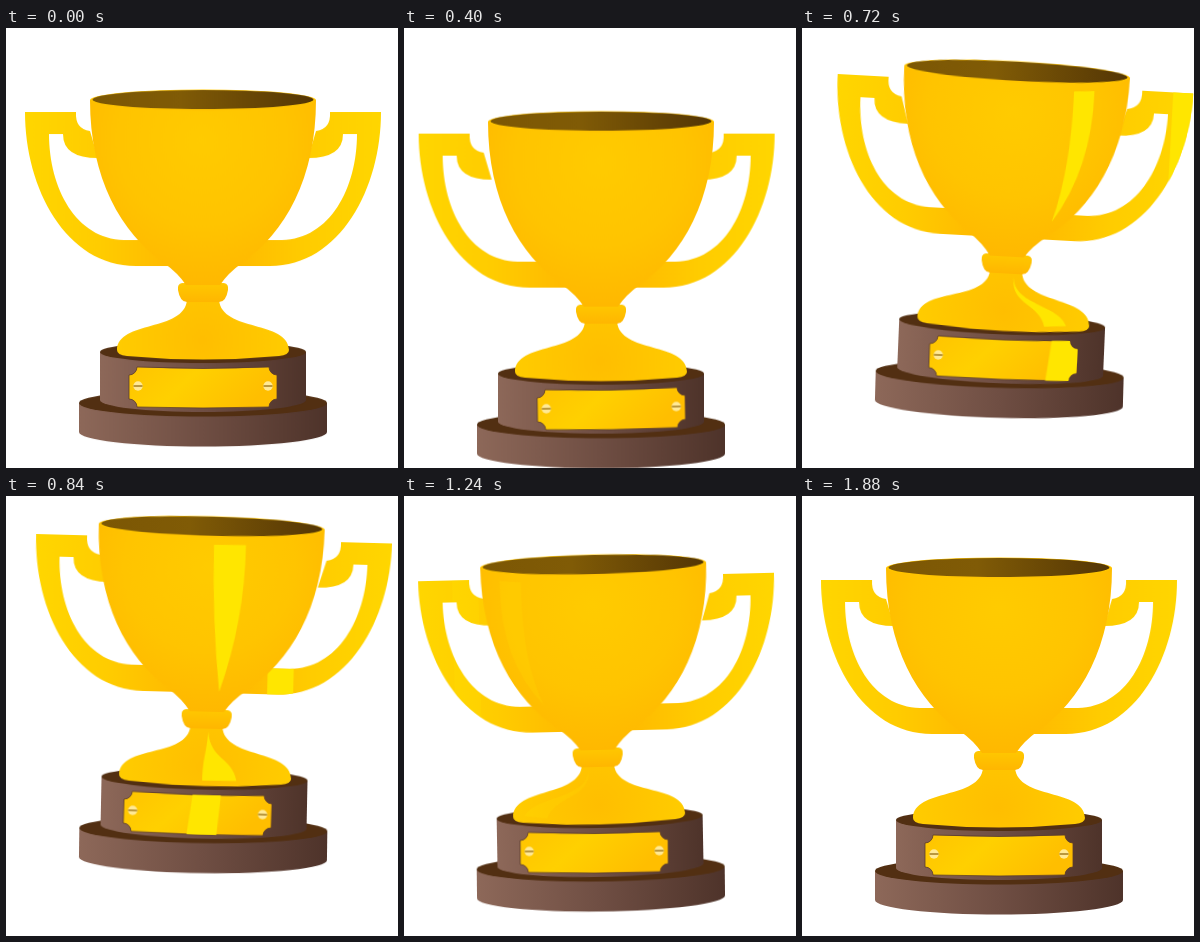
Recreate the animation shown at these times as an HTML page. Size 392 by 440 pixels, loop 1920 ms.

```html
<!DOCTYPE html>
<html lang="en">
<head>
<meta charset="utf-8">
<title>Trophy jump</title>
<style>
html, body { margin: 0; width: 100%; height: 100%; overflow: hidden; background: #fff; }
svg { display: block; width: 392px; height: 440px; }
.jump, .swing, .yaw, .turn, .glare, .strip, .flash { animation: 1920ms linear infinite; }
.jump { animation-name: jump; }
.swing { animation-name: swing; transform-origin: 197px 400px; --k: 1; }
.drum { --k: .75; }
.disk { --k: .5; }
.yaw { animation-name: yaw; }
.turn { animation-name: turn; transform-origin: 197px 359px; }
.glare { animation-name: glare; fill: #ffe600; }
.strip { animation-name: strip; }
.flash { animation-name: flash; }

@keyframes jump {
  0% { transform: translateY(0); animation-timing-function: ease; }
  25%, 31.6% { transform: translateY(22px); animation-timing-function: ease; }
  43.6% { transform: translateY(-41.5px); animation-timing-function: ease; }
  75%, 100% { transform: translateY(0); }
}
/* --k: the lower parts lean less than the cup */
@keyframes swing {
  0%, 30.9% { transform: rotate(0deg); animation-timing-function: ease-in-out; }
  36.6% { transform: rotate(calc(3.2deg * var(--k))); animation-timing-function: ease-in-out; }
  55.8% { transform: rotate(calc(-2.5deg * var(--k))); animation-timing-function: ease-in-out; }
  74.5%, 100% { transform: rotate(0deg); }
}
/* handles drift against the plate as the trophy turns */
@keyframes yaw {
  0% { transform: translateX(0); animation-timing-function: ease; }
  25%, 28.6% { transform: translateX(-4.4px); animation-timing-function: ease-in-out; }
  48%, 57% { transform: translateX(3.4px); animation-timing-function: ease; }
  100% { transform: translateX(0); }
}
@keyframes turn {
  0% { transform: translateX(0) rotate(0); animation-timing-function: ease; }
  25%, 28.6% { transform: translateX(10.5px) rotate(-1deg); animation-timing-function: ease-in-out; }
  48%, 57% { transform: translateX(-8px) rotate(.9deg); animation-timing-function: ease; }
  100% { transform: translateX(0) rotate(0); }
}
@keyframes glare {
  0%, 30.5% { opacity: 0; }
  31.5%, 54% { opacity: 1; }
  66.5%, 100% { opacity: 0; }
}
@keyframes strip {
  0%, 31.25% { transform: translateX(273px); }
  56.25%, 100% { transform: translateX(-131px); }
}
@keyframes flash {
  0%, 31.25% { transform: translateX(114px); }
  56.25%, 100% { transform: translateX(-99px); }
}
</style>
</head>
<body>
<svg viewBox="0 0 392 440">
  <defs>
    <linearGradient id="wood">
      <stop stop-color="#8d6859"/><stop offset=".5" stop-color="#6f4e43"/><stop offset="1" stop-color="#4e332a"/>
    </linearGradient>
    <linearGradient id="inside">
      <stop stop-color="#7c5704"/><stop offset=".4" stop-color="#805b06"/><stop offset="1" stop-color="#543605"/>
    </linearGradient>
    <linearGradient id="arm">
      <stop stop-color="#ffd600"/><stop offset=".5" stop-color="#ffcc00"/><stop offset="1" stop-color="#ffb900"/>
    </linearGradient>
    <linearGradient id="brass" x2="1" y2=".3">
      <stop stop-color="#ffc400"/><stop offset=".45" stop-color="#ffd000"/><stop offset="1" stop-color="#ffbe00"/>
    </linearGradient>
    <linearGradient id="neck" x2="0" y2="1">
      <stop stop-color="#ffc800"/><stop offset="1" stop-color="#ffb600"/>
    </linearGradient>
    <radialGradient id="gold" gradientUnits="userSpaceOnUse" cx="196" cy="112" r="155">
      <stop stop-color="#ffcb00"/><stop offset=".55" stop-color="#ffc400"/><stop offset="1" stop-color="#ffb600"/>
    </radialGradient>
    <radialGradient id="footGold" gradientUnits="userSpaceOnUse" cx="197" cy="312" r="88">
      <stop stop-color="#ffbe00"/><stop offset="1" stop-color="#ffcc00"/>
    </radialGradient>
    <path id="handle" d="M19 84H70Q69 101 84 103L92 130Q57 130 57 106H43C43 160 70 211 118 212H140L170 238H130C60 238 19 160 19 84Z"/>
    <path id="bowl" d="M84 72C84 150 115 205 158 235Q172 245 180 257H214Q222 245 236 235C279 205 310 150 310 72Z"/>
    <path id="foot" d="M181 272C178 304 112 292 111 322Q111 327 121 328Q197 335 273 328Q283 327 283 322C282 292 216 304 213 272Z"/>
    <path id="plate" d="M131 339Q197 342 263 339A8 8 0 0 0 271 347V371A8 8 0 0 0 263 379Q197 381 131 379A8 8 0 0 0 123 371V347A8 8 0 0 0 131 339Z"/>
    <g id="screw">
      <circle r="4.7" fill="#ffe995"/><path d="M-4.5 0H4.5" stroke="#9b7418" stroke-width="1.4"/>
    </g>
    <clipPath id="onHandles">
      <use href="#handle"/><use href="#handle" transform="matrix(-1 0 0 1 394 0)"/>
    </clipPath>
    <clipPath id="onBowl"><use href="#bowl"/></clipPath>
    <clipPath id="onFoot"><use href="#foot"/></clipPath>
    <clipPath id="onPlate"><use href="#plate"/></clipPath>
  </defs>

  <g class="jump">
    <g class="swing disk">
      <path d="M73 375V404A124 14.5 0 0 0 321 404V375Z" fill="url(#wood)"/>
      <ellipse cx="197" cy="375" rx="124" ry="13.5" fill="#522f12"/>
    </g>

    <g class="swing drum">
      <path d="M94 324V372A103 12 0 0 0 300 372V324Z" fill="url(#wood)"/>
      <ellipse cx="197" cy="324" rx="103" ry="11" fill="#522f12"/>
      <g class="turn">
        <use href="#plate" fill="url(#brass)" stroke="#5a3a2b" stroke-width=".8"/>
        <use href="#screw" x="132" y="358"/>
        <use href="#screw" x="262" y="358"/>
        <g class="glare" clip-path="url(#onPlate)">
          <path class="flash" d="M185 336H213L209 384H179Z"/>
        </g>
      </g>
    </g>

    <g class="swing">
      <g class="yaw">
        <use href="#handle" fill="url(#arm)"/>
        <use href="#handle" fill="url(#arm)" transform="matrix(-1 0 0 1 394 0)"/>
        <g class="glare" clip-path="url(#onHandles)">
          <rect class="strip" x="184" y="80" width="26" height="164"/>
        </g>
      </g>

      <use href="#foot" fill="url(#footGold)"/>
      <g class="glare" clip-path="url(#onFoot)"><path id="footGlare"/></g>
      <path d="M176 255H218Q223 256 222 262Q220 274 213 274H181Q174 274 172 262Q171 256 176 255Z" fill="url(#neck)"/>
      <use href="#bowl" fill="url(#gold)"/>
      <g class="glare" clip-path="url(#onBowl)"><path id="bowlGlare"/></g>
      <ellipse cx="197" cy="72" rx="113" ry="10.5" fill="#ffc400"/>
      <ellipse cx="197" cy="71.5" rx="110.5" ry="9.5" fill="url(#inside)"/>
    </g>
  </g>
</svg>
<script>
const LOOP = 1920, AXIS = 197;
const bowlGlare = document.getElementById('bowlGlare');
const footGlare = document.getElementById('footGlare');

// Piecewise linear track of [time, value] points.
function track(points, t) {
  if (t <= points[0][0]) return points[0][1];
  for (let i = 1; i < points.length; i++) {
    const [t0, v0] = points[i - 1], [t1, v1] = points[i];
    if (t <= t1) return v0 + (v1 - v0) * (t - t0) / (t1 - t0);
  }
  return points[points.length - 1][1];
}

const at = (x, y) => `${(AXIS + x).toFixed(2)} ${y.toFixed(2)}`;

// Both glares lie between two meridians that meet in a tip.
function bowlBand(angle, half) {
  const [u0, u, u1] = [angle - half, angle, angle + half].map(Math.sin);
  const top = u => at(112 * u, 90 - 6 * u * u);
  const side = u => at(114 * u, 165);
  const tip = at(70 * u, 238 - 48 * u * u);
  return `M${top(u0)}Q${side(u0)} ${tip}Q${side(u1)} ${top(u1)}Z`;
}

function footBand(angle, half) {
  const [u0, u, u1] = [angle - half, angle, angle + half].map(Math.sin);
  const low = u => at(86 * u, 317 + 9 * Math.sqrt(1 - u * u));
  const upper = u => at(12 * u, 305);
  const lower = u => at(74 * u, 302);
  const tip = at(13 * u, 277);
  return `M${tip}C${upper(u0)} ${lower(u0)} ${low(u0)}` +
    `L${low(u1)}C${lower(u1)} ${upper(u1)} ${tip}Z`;
}

function draw(t) {
  const angle = track([[600, 1.14], [640, .985], [840, .17], [1000, -.62], [1120, -.85]], t);
  const half = track([[600, .06], [640, .085], [800, .145]], t);
  bowlGlare.setAttribute('d', bowlBand(angle, half));
  footGlare.setAttribute('d', footBand(angle, half * 1.4));
}

let start;
function tick(now) {
  start ??= now;
  draw((now - start) % LOOP);
  requestAnimationFrame(tick);
}
draw(0);
requestAnimationFrame(tick);
</script>
</body>
</html>
```
